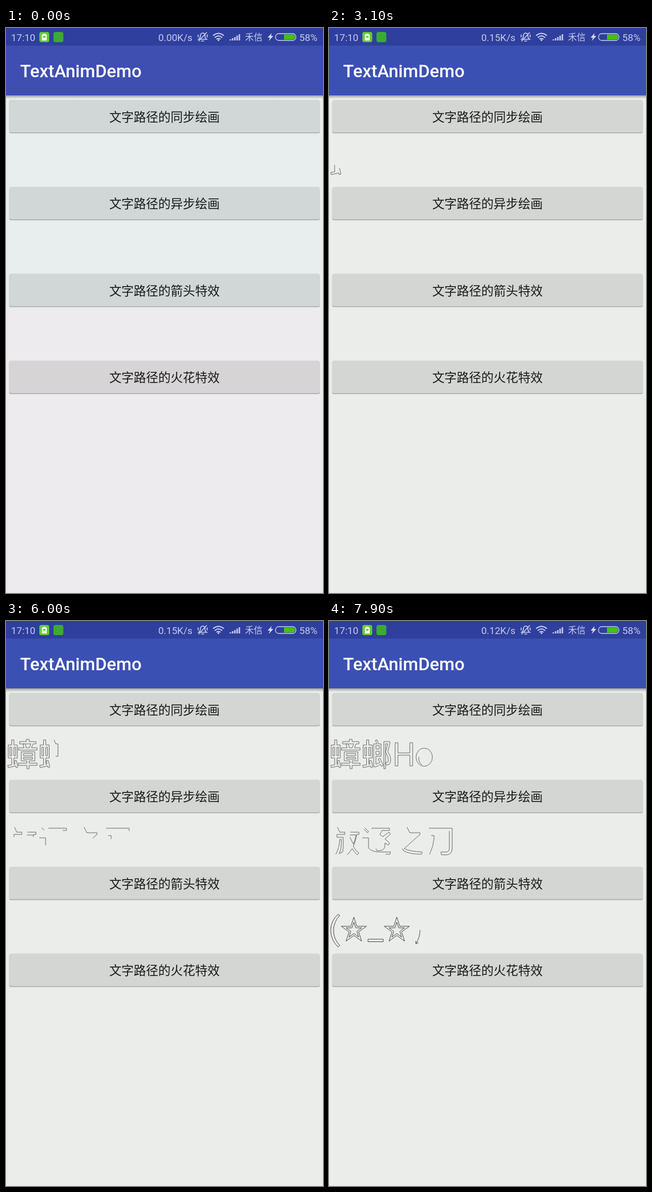
Animation of 561 by 998 pixels, one loop 8 s. Source, as an HTML page:

```html
<!DOCTYPE html>
<html lang="zh">
<head>
<meta charset="utf-8">
<title>TextAnimDemo</title>
<style>
  html, body { margin: 0; width: 100%; height: 100%; overflow: hidden; background: #ebedea; }
  svg { display: block; width: 100%; height: 100%; }
  text { font-family: Roboto, "Noto Sans CJK SC", "Noto Sans CJK", sans-serif; }
  .status { font-size: 17.3px; fill: #c5cbec; }
  .title { font-size: 31.2px; font-weight: 500; fill: #fff; }
  .label { font-size: 21.75px; fill: #181918; text-anchor: middle;
    font-family: "Noto Sans CJK SC", "Noto Sans CJK", sans-serif; }
  .ink { fill: none; stroke: #6c6d6c; stroke-width: 1; }
  .dark { stroke: #4b4c4b; }
  .icon { fill: none; stroke: #c5cbec; stroke-width: 1.6; stroke-linecap: round; }
</style>
</head>
<body>
<svg id="stage" viewBox="0 0 561 998" preserveAspectRatio="none">
  <defs>
    <linearGradient id="shade" x2="0" y2="1">
      <stop stop-color="#000" stop-opacity=".32"/>
      <stop offset="1" stop-color="#000" stop-opacity="0"/>
    </linearGradient>
  </defs>
  <rect id="upper" width="561" height="998"/>
  <rect id="lower" y="493" width="561" height="505"/>
  <rect width="561" height="32" fill="#2f3f9d"/>
  <rect id="bar" y="31" width="561" height="88"/>
  <rect y="119" width="561" height="6" fill="url(#shade)"/>
  <text class="title" x="25" y="87">TextAnimDemo</text>

  <text class="status" x="9" y="22.5">17:10</text>
  <rect x="59" y="7" width="17.5" height="18" rx="3.5" fill="#63cc33"/>
  <path d="M65.5 10h4.5v1.5h2v10.500h-8.500v-10.500h2z" fill="#fff"/>
  <rect x="65.500" y="14" width="4.500" height="3" fill="#63cc33"/>
  <rect x="84" y="7" width="17.500" height="18" rx="3.500" fill="#3daa35"/>
  <text id="rate" class="status" x="330" y="22.5" text-anchor="end"></text>
  <g class="icon">
    <path d="M341 20Q344 18 344 13Q345 9 348 9Q352 9 352 13Q352 18 355 20ZM346 23H350M341 23L355 8M340 12V16M356 12V16"/>
    <path d="M367 13Q376 6 385 13M370 16.500Q376 11.500 382 16.500M373 19.500Q376 17.500 379 19.500" stroke-width="2"/>
    <path d="M397 22V20M401 22V18M405 22V16M409 22V13.500M413 22V11" stroke-width="2.600" stroke-linecap="butt"/>
    <rect x="477" y="10" width="36" height="12" rx="5.500" stroke-width="1.300"/>
  </g>
  <circle cx="376" cy="21.500" r="1.600" fill="#c5cbec"/>
  <text class="status" x="423" y="22" style="font-size:15.6px">禾信</text>
  <path d="M470 9L463 17H467L465 23L473 14H469Z" fill="#d5daf2"/>
  <path d="M492 11.500H507Q511.500 11.500 511.500 16T507 20.500H492Z" fill="#44c40c"/>
  <text class="status" x="519" y="22.5">58%</text>
</svg>
<script>
const LOOP = 8000;
const stage = document.getElementById('stage');
const byId = id => document.getElementById(id);
const clamp = v => Math.max(0, Math.min(1, v));
const span = (t, a, b) => clamp((t - a) / (b - a));

function add(tag, attrs, parent = stage) {
  const el = document.createElementNS('http://www.w3.org/2000/svg', tag);
  for (const key in attrs) el.setAttribute(key, attrs[key]);
  return parent.appendChild(el);
}

// Buttons
const captions = ['同步绘画', '异步绘画', '箭头特效', '火花特效'];
const tapTimes = [2310, 3900, 6010, Infinity];
const buttons = captions.map((caption, i) => {
  const y = 127 + i * 153.5;
  const box = { x: 6, y, width: 549, height: 57.5, rx: 3 };
  add('rect', { ...box, x: 5, width: 551, y: y + 2, fill: '#000', opacity: .09 });
  add('rect', { ...box, y: y + 1.3, fill: '#000', opacity: .22 });
  const face = add('rect', box);
  add('rect', box, add('clipPath', { id: 'clip' + i }));
  const press = add('g', { 'clip-path': `url(#clip${i})` });
  add('rect', { ...box, opacity: .035 }, press);
  const ripple = add('circle', { cx: 302, cy: y + 29, opacity: .04 }, press);
  add('text', { class: 'label', x: 280.5, y: y + 37.5 }).textContent = '文字路径的' + caption;
  return { face, press, ripple, tap: tapTimes[i] };
});

// Outlines: every contour is its own path so that it can be traced separately
function trace(d, dx = 0, style = 'ink') {
  return d.match(/M[^M]+/g).map(part => {
    const el = add('path', { d: part, class: style, transform: `translate(${dx} 0)` });
    return { el, length: el.getTotalLength() };
  });
}
const total = parts => parts.reduce((sum, part) => sum + part.length, 0);

function reveal(part, length) {
  part.el.style.display = length > 0 ? '' : 'none';
  part.el.style.strokeDasharray = length < part.length ? `${Math.max(length, .01)} 9999` : 'none';
}

function revealInTurn(parts, length) {
  for (const part of parts) {
    reveal(part, length);
    length -= part.length;
  }
}

const insect = 'M10 242V254L3 255L4 259L17 256L18 259L21 258Q20 252 18 246L15 247L16 253L14 253V242H20V219H14V210H10V219H4V242Z' +
  'M7 223H10V238H7ZM14 223H17V238H14Z';
const chapter = 'M24 213H36V209H41V213H53V217H48L45 224H55V228H22V224H32L30 218L33 217H24Z' +
  'M34 217L36 224H41L44 217Z' +
  'M37 247H27V231H51V247H41V251H55V255H41V261H37V255H22V251H37Z' +
  'M31 234H47V238H31ZM31 241H47V244H31Z';
const youth = 'M85 210L88 217H92V239H83V253L90 250L87 244L90 242L96 255L93 257L91 253Q87 257 80 258L79 255V217H85L82 211Z' +
  'M83 220H89V226H83ZM83 230H89V236H83Z' +
  'M97 213H107L108 215Q106 224 104 231Q110 239 109 247Q108 256 101 254L100 250Q105 251 105 246Q105 239 100 231Q102 225 104 217H100V261H97Z';
const letterH = 'M117 256H122V237H143V256H148V215H143V233H122V215H117Z';
const letterO = 'M154 240.5A14.5 16 0 1 0 183 240.5A14.5 16 0 1 0 154 240.5Z' +
  'M159 240A9.700 12.500 0 1 0 178 240A9.700 12.500 0 1 0 159 240Z';

const syncRow = [
  { d: insect, from: 2450, to: 4070, power: 1.65 },
  { d: chapter, from: 4070, to: 5230 },
  { d: insect, dx: 56.5, from: 5230, to: 5900 },
  { d: youth, from: 5900, to: 7010 },
  { d: letterH, from: 7010, to: 7600 },
  { d: letterO, from: 7600, to: 8075 }
].map(group => ({ power: 1, ...group, parts: trace(group.d, group.dx) }));

const asyncRow = trace(
  'M15 364L19 373H28V377H14V382H25Q26 400 24 408L18 411L19 408Q22 404 22 386H19Q18 402 12 412' +
  'M38 373H53V377H49Q47 390 43 398Q47 406 53 410L50 413Q44 408 41 402Q36 410 32 413' +
  'M37 378H48Q46 388 43 394Q40 388 37 382' +
  'M63 365L70 372L68 374L62 368' +
  'M75 366H107V370H94L90 377L95 381L106 373L109 376L99 385L107 392L105 396L99 392Q100 402 94 405L85 406L83 402' +
  'M59 383H70V401Q76 408 90 408H109L108 412H100' +
  'M138 364L143 374H161V377L133 402Q143 407 165 408L164 412Q143 412 132 406L130 402' +
  'M177 366H218V403Q217 412 209 413H199L198 408H207Q213 408 213 401V371' +
  'M181 379H186V383Q185 398 178 412');

function star(cx, radius) {
  const points = Array.from({ length: 10 }, (_, i) => {
    const r = i % 2 ? radius * .382 : radius;
    const a = i * Math.PI / 5;
    return (cx + r * Math.sin(a)).toFixed(1) + ' ' + (546.5 - r * Math.cos(a)).toFixed(1);
  });
  return 'M' + points.join('L') + 'Z';
}
const arrowRow = trace(
  'M16 518L19 520Q8 532 8 546Q8 562 19 573L16 576Q3 563 3 546Q3 530 16 518Z' +
  star(44, 23.5) + star(44, 14.5) + 'M69 562H96V566.5H69Z' + star(120, 23.5) + star(120, 14.5) +
  'M161 546Q161 563 149 576L146 573Q157 562 157 546Q157 531 146 520L149 518Q161 530 161 546Z', 0, 'ink dark');
const arrowLength = total(arrowRow);
const arrow = add('path', { class: 'ink dark' });

function drawArrow(length) {
  const visible = length > 0 && length < arrowLength - .5;
  arrow.style.display = visible ? '' : 'none';
  if (!visible) return;
  let i = 0;
  while (length > arrowRow[i].length) length -= arrowRow[i++].length;
  const head = arrowRow[i].el.getPointAtLength(length);
  const back = arrowRow[i].el.getPointAtLength(Math.max(0, length - 1));
  const angle = Math.atan2(back.y - head.y, back.x - head.x);
  const leg = turn => `${head.x + 5 * Math.cos(angle + turn)} ${head.y + 5 * Math.sin(angle + turn)}`;
  arrow.setAttribute('d', `M${leg(.6)}L${head.x} ${head.y}L${leg(-.6)}`);
}

const easeInOut = u => (1 - Math.cos(Math.PI * u)) / 2;

function render(t) {
  const early = t < 2400;
  byId('upper').setAttribute('fill', early ? '#e8eded' : '#ebedea');
  byId('lower').setAttribute('fill', early ? '#edebed' : '#ebedea');
  byId('bar').setAttribute('fill', early ? '#3e4eb1' : '#3b50b3');
  byId('rate').textContent = early ? '0.00K/s' : t < 6500 ? '0.15K/s' : '0.12K/s';

  buttons.forEach(({ face, press, ripple, tap }, i) => {
    face.setAttribute('fill', !early ? '#d4d6d3' : i < 3 ? '#d1d6d7' : '#d7d4d6');
    const age = t - tap;
    press.style.opacity = age < 0 ? 0 : 1 - span(age, 250, 550);
    ripple.setAttribute('r', Math.max(0, Math.min(320, 40 + age)));
  });

  for (const { parts, from, to, power } of syncRow) {
    revealInTurn(parts, total(parts) * span(t, from, to) ** power);
  }

  const spread = easeInOut(span(t, 4080, 12080)) / easeInOut(3820 / 8000);
  for (const part of asyncRow) {
    reveal(part, t < 4080 ? 0 : Math.max(.9, part.length * spread));
  }

  // Slows down to the end, then runs back the same way
  const fromEnd = Math.abs(t - 7433) / 1348;
  const drawn = t < 6085 ? 0 : arrowLength * (1 - fromEnd ** 2);
  revealInTurn(arrowRow, drawn);
  drawArrow(drawn);
}

const start = performance.now();
function tick() {
  render((performance.now() - start) % LOOP);
  requestAnimationFrame(tick);
}
tick();
</script>
</body>
</html>
```
